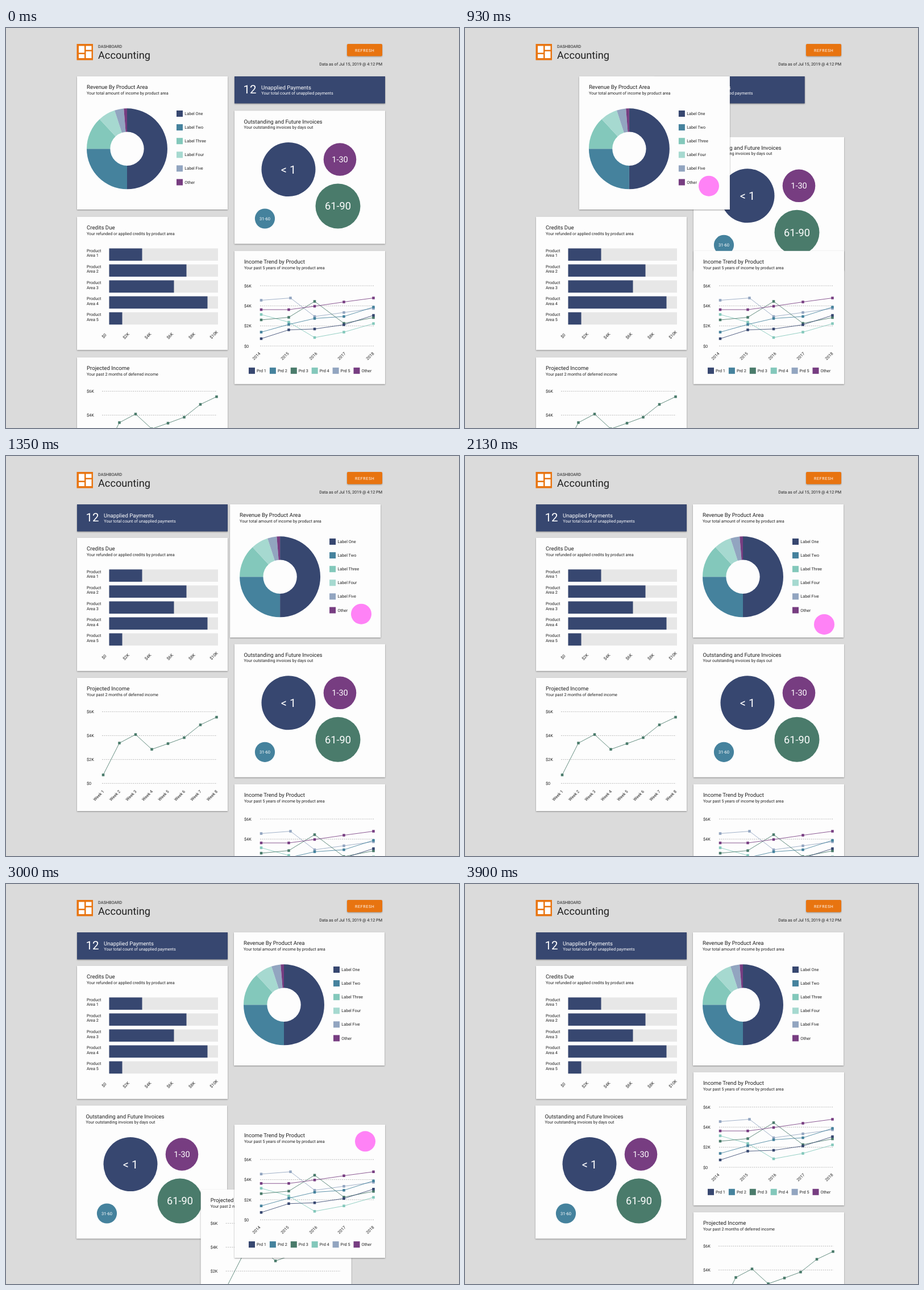
These frames come from a looping animation (797x703 px, 5.43 s). An HTML page:

```html
<!DOCTYPE html>
<html lang="en">
<head>
<meta charset="utf-8">
<title>Accounting dashboard</title>
<style>
  html, body { margin: 0; width: 100%; height: 100%; overflow: hidden; background: #dbdbdb; }
  svg { display: block; }
  text { font: 7.25px Roboto, "Open Sans", sans-serif; fill: #212121; text-rendering: geometricPrecision; }
  .title { font-size: 9.65px; }
  .light { fill: #fff; }
  .mid { text-anchor: middle; }
  .panel { fill: #fdfdfd; filter: drop-shadow(0 1px 1.3px rgba(0, 0, 0, .38)); }
  .grid { stroke: #b4b4b4; stroke-width: .9; stroke-dasharray: 2 1.6; }
  .line { fill: none; stroke-width: 1; stroke-opacity: .85; }
</style>
</head>
<body>
<svg id="stage" width="797" height="703" viewBox="0 0 797 703"></svg>
<script>
const LOOP = 5430, TICK = 30;
const navy = '#374770', blue = '#45829d', mint = '#83c8bb', pale = '#a6d9d0',
      steel = '#92a5c0', plum = '#773d81', green = '#4a7b6b', orange = '#e87410';

// Drawing helpers
const rect = (x, y, w, h, fill, extra = '') =>
  `<rect x="${x}" y="${y}" width="${w}" height="${h}" fill="${fill}" ${extra}/>`;
const text = (x, y, label, cls = '', extra = '') =>
  `<text x="${x}" y="${y}" class="${cls}" ${extra}>${label}</text>`;
const slanted = (x, y, label) =>
  text(0, 2.6, label, 'mid', `transform="translate(${x} ${y}) rotate(-45)"`);
const swatch = (x, y, fill, label, gap) =>
  rect(x, y, 11, 11, fill) + text(x + gap, y + 8, label);
const gridLine = (x1, x2, y, labelX, label) =>
  `<path class="grid" d="M${x1} ${y}H${x2}"/>` + text(labelX, y + 2.7, label);
const series = (xs, ys, color) =>
  `<polyline class="line" stroke="${color}" points="${xs.map((x, i) => x + ',' + ys[i]).join(' ')}"/>` +
  xs.map((x, i) => rect(x - 2.25, ys[i] - 2.25, 4.5, 4.5, color)).join('');
const card = (id, x, y, title, subtitle, body, inset = 17) =>
  `<g id="${id}"><rect class="panel" x="${x}" y="${y}" width="265" height="234"/>` +
  text(x + inset, y + 22.4, title, 'title') + text(x + inset, y + 31.8, subtitle) + body + '</g>';

function donut(cx, cy, outer, inner, parts) {
  const at = (r, part) => {
    const a = part * 2 * Math.PI;
    return `${(cx + r * Math.sin(a)).toFixed(2)} ${(cy - r * Math.cos(a)).toFixed(2)}`;
  };
  let from = 0;
  return parts.map(([to, color]) => {
    const d = `M${at(outer, from)}A${outer} ${outer} 0 0 1 ${at(outer, to)}` +
              `L${at(inner, to)}A${inner} ${inner} 0 0 0 ${at(inner, from)}Z`;
    from = to;
    return `<path fill="${color}" d="${d}"/>`;
  }).join('');
}

function header() {
  const tiles = [[128, 31.5, 10, 12], [128, 46, 10, 7], [140.5, 31.5, 10, 7], [140.5, 41, 10, 12]];
  return rect(124.5, 28, 28.5, 28.5, orange) +
    tiles.map(t => rect(...t, '#fff')).join('') +
    text(162, 34.5, 'DASHBOARD') +
    text(162, 53.8, 'Accounting', '', 'style="font-size:18.2px"') +
    rect(600, 28, 62, 21.5, orange, 'rx="2" style="filter:drop-shadow(0 1px 1px rgba(0,0,0,.3))"') +
    text(631.2, 41.6, 'REFRESH', 'light mid', 'style="font-size:7px;letter-spacing:.7px"') +
    text(662, 65.6, 'Data as of Jul 15, 2019 @ 4:12 PM', '', 'text-anchor="end"');
}

function unapplied() {
  return `<g id="unapplied"><rect class="panel" x="402" y="85" width="265" height="47.5" style="fill:${navy}"/>` +
    text(417.5, 115.3, '12', 'light', 'style="font-size:20.5px"') +
    text(449, 107.5, 'Unapplied Payments', 'title light') +
    text(449.3, 116.8, 'Your total count of unapplied payments', 'light') + '</g>';
}

function invoices() {
  const bubbles = [[497, 248.5, 47.5, navy, '&lt; 1', 20], [587.5, 231, 28.8, plum, '1-30', 14.5],
                   [584, 313, 39.5, green, '61-90', 18.2], [455.5, 335, 17.6, blue, '31-60', 7.5]];
  const body = bubbles.map(([x, y, r, color, label, size]) =>
    `<circle cx="${x}" cy="${y}" r="${r}" fill="${color}"/>` +
    text(x, y + size * .355, label, 'light mid', `style="font-size:${size}px"`)).join('');
  return card('invoices', 402, 145.3, 'Outstanding and Future Invoices',
              'Your outstanding invoices by days out', body, 16.5);
}

function credits() {
  const body = [58, 136, 114, 173, 23].map((w, i) => {
    const y = 387.4 + i * 28.05;
    return rect(181.5, y, 191.5, 21.6, '#e7e7e7') + rect(181.5, y, w, 21.6, navy) +
      text(142, y + 6.8, 'Product') + text(142, y + 15, 'Area ' + (i + 1));
  }).join('') + ['$0', '$2K', '$4K', '$6K', '$8K', '$10K'].map((label, i) =>
    slanted(172.5 + i * 38.6, i > 4 ? 539 : 541, label)).join('');
  return card('credits', 125, 331.8, 'Credits Due',
              'Your refunded or applied credits by product area', body);
}

function projected() {
  const xs = Array.from({ length: 8 }, (_, i) => 171 + i * 28.5);
  const ys = [749.5, 693.5, 678.5, 704.5, 694.5, 684, 661.5, 648];
  const body = ['$6K', '$4K', '$2K', '$0'].map((label, i) =>
    gridLine(169, 371, 638.4 + i * 42, 142, label)).join('') +
    series(xs, ys, green) +
    xs.map((x, i) => slanted(x - 8, 785.5, 'Week ' + (i + 1))).join('');
  return card('projected', 125, 579, 'Projected Income',
              'Your past 2 months of deferred income', body);
}

function income() {
  const xs = [449, 497.5, 543, 594.5, 646.5];
  const trends = [
    [steel, [478.5, 474.5, 507, 500, 493]],
    [mint, [503.5, 517, 544, 534.5, 519.5]],
    [green, [513, 508.5, 480.5, 519, 509]],
    [blue, [534.5, 521, 510.5, 507, 490.5]],
    [navy, [546, 530.5, 529, 521.5, 505]],
    [plum, [495, 495, 489, 481.5, 474.5]]];
  const body = ['$6K', '$4K', '$2K', '$0'].map((label, i) =>
    gridLine(447, 648, 453 + i * 35.3, 419, label)).join('') +
    trends.map(([color, ys]) =>
      series(color === steel ? xs.with(1, 500.5) : xs, ys, color)).join('') +
    xs.map((x, i) => slanted(440.5 + i * 50, 576.5, 2014 + i)).join('') +
    [navy, blue, green, mint, steel, plum].map((color, i) =>
      swatch(427 + i * 36.9, 596.8, color, i < 5 ? 'Prd ' + (i + 1) : 'Other', 14)).join('');
  return card('income', 402, 391.8, 'Income Trend by Product',
              'Your past 5 years of income by product area', body);
}

function revenue() {
  const labels = ['Label One', 'Label Two', 'Label Three', 'Label Four', 'Label Five', 'Other'];
  const colors = [navy, blue, mint, pale, steel, plum];
  const ends = [.5, .75, .881, .95, .987, 1];
  const body = donut(213, 212.3, 71, 29.7, ends.map((end, i) => [end, colors[i]])) +
    labels.map((label, i) => swatch(300, 145 + i * 24.1, colors[i], label, 14.3)).join('');
  return card('revenue', 125, 85, 'Revenue By Product Area',
              'Your total amount of income by product area', body);
}

const stage = document.getElementById('stage');
stage.innerHTML = header() + unapplied() + invoices() + credits() + projected() +
  income() + revenue() + '<circle id="pointer" fill="#ff82f6"/>';

// Tracks: [ms, ...values], linear between keys
const moves = {
  revenue: [[765, 0, 0], [1365, 276, 0]],
  unapplied: [[885, 0, 0], [1065, -277, 0]],
  invoices: [[885, 0, 0], [1065, 0, 185.3], [2745, 0, 185.3], [2925, -278, 244]],
  credits: [[975, 0, 0], [1155, 0, -188]],
  income: [[975, 0, 0], [1155, 0, 185], [2625, 0, 185], [3225, 0, -61]],
  projected: [[1035, 0, 0], [1215, 0, -189], [2835, 0, -189], [3045, 277, -2]]
};
const pointerPath = [[765, 352, 277.7], [1365, 632, 277.7], [2104, 632, 277.7],
                     [2580, 632, 612], [2625, 632, 612], [3225, 632, 356.5]];
const pointerFade = [[45, 0], [345, 1], [3585, 1], [3885, 0]];
const pointerSize = [[345, 22.3], [465, 18]];

function valueAt(track, t) {
  const next = track.findIndex(key => key[0] > t);
  if (next === 0) return track[0].slice(1);
  if (next < 0) return track.at(-1).slice(1);
  const a = track[next - 1], b = track[next];
  const p = (t - a[0]) / (b[0] - a[0]);
  return a.slice(1).map((v, i) => v + (b[i + 1] - v) * p);
}

const pointer = document.getElementById('pointer');
const cards = Object.entries(moves).map(([id, track]) => [document.getElementById(id), track]);

function draw(t) {
  for (const [node, track] of cards)
    node.setAttribute('transform', `translate(${valueAt(track, t).join(' ')})`);
  const [x, y] = valueAt(pointerPath, t);
  pointer.setAttribute('cx', x);
  pointer.setAttribute('cy', y);
  pointer.setAttribute('r', valueAt(pointerSize, t)[0]);
  pointer.setAttribute('opacity', valueAt(pointerFade, t)[0]);
}

const start = performance.now();
function tick() {
  const t = (performance.now() - start) % LOOP;
  draw(Math.floor(t / TICK) * TICK);
  requestAnimationFrame(tick);
}
tick();
</script>
</body>
</html>
```
